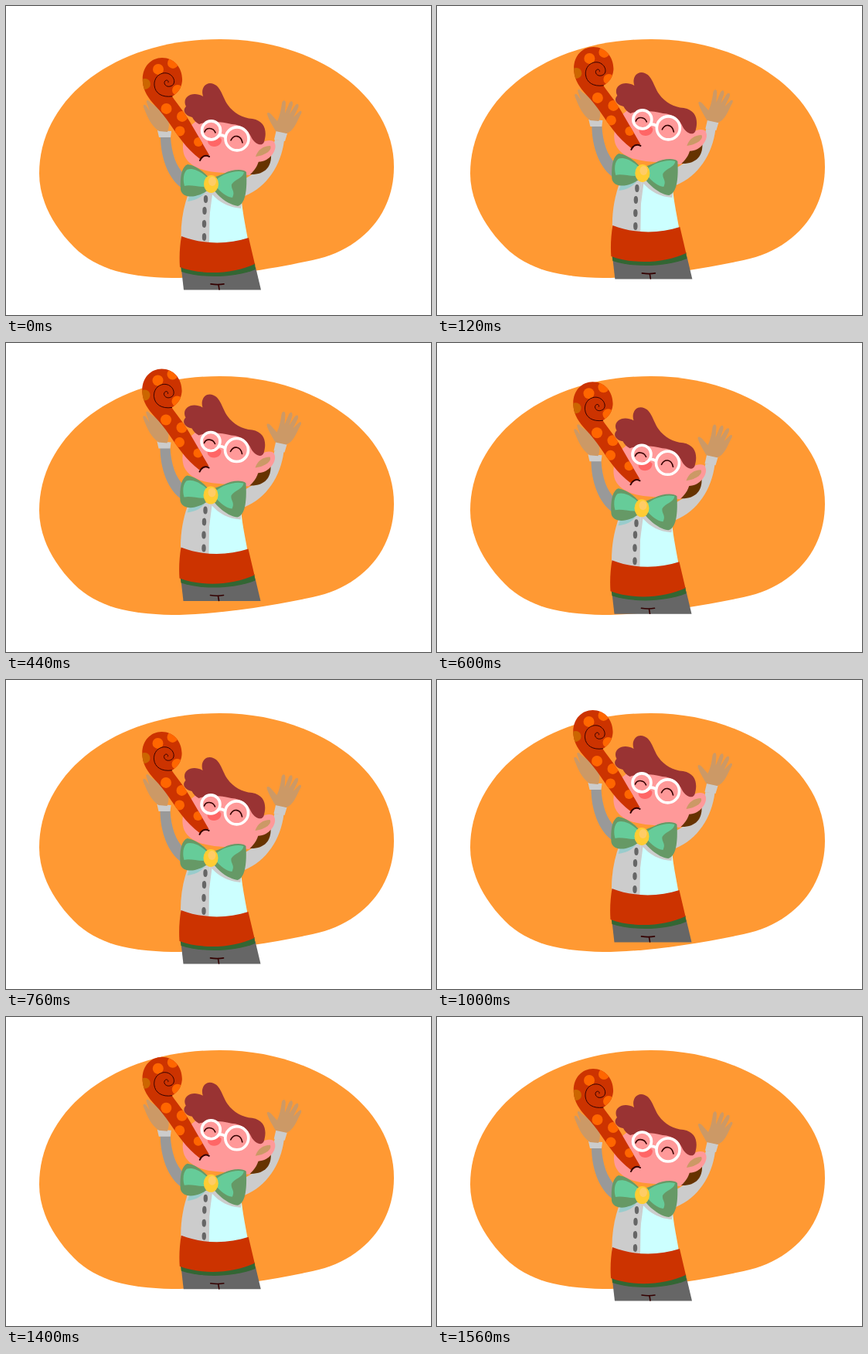
Animation, 550 px wide and 400 px high, one loop 1.6 s. Source, as an HTML page:

```html
<!DOCTYPE html>
<html lang="en">
<head>
<meta charset="utf-8">
<title>Party horn jump</title>
<style>
  html, body { margin: 0; width: 100%; height: 100%; overflow: hidden; background: #fff; }
  svg { display: block; width: 100vw; height: 100vh; }
  .line { fill: none; stroke: #300; stroke-width: 1.6; stroke-linecap: round; }
</style>
</head>
<body>
<svg viewBox="0 0 550 400">
  <defs>
    <path id="horn" d="M177 99C175 80 187 67 202 67C218 67 229 81 228 97C227 107 222 113 215 117C221 126 230 136 238 150L263 193C258 194 254 196 251 198C242 191 235 184 228 175C217 161 207 143 193 129C184 119 178 110 177 99Z"/>
    <clipPath id="hornClip"><use href="#horn"/></clipPath>
  </defs>

  <path fill="#f93" d="M277 43C400 43 502 115 502 208C502 270 460 313 405 327C350 340 270 352 215 352C160 351 118 342 88 312C60 284 43 250 43 217C43 120 140 43 277 43Z"/>

  <g id="boy">
    <!-- arms -->
    <path fill="#999" d="M200 169H213C214 190 220 208 231 218L228 236C210 224 200 196 200 169Z"/>
    <path fill="#ccc" d="M348 173L360 174C356 206 338 234 309 246L308 224C330 214 343 195 348 173Z"/>
    <path fill="#ccc" d="M196 161L214 162L213 170L198 170ZM350 160L364 165L361 175L347 173Z"/>

    <!-- hands -->
    <path fill="#c96" d="M198 162C188 155 184 146 178 131C177 127 180 127 182 130L186 136L182 125C181 121 184 121 187 125L205 138C212 146 212 156 209 163Z"/>
    <path fill="#c96" d="M349 162C345 155 340 147 338 140C338 137 341 138 343 140L351 149C354 143 356 134 357 126C358 121 362 121 362 126L361 139L366 127C368 122 372 122 371 128L367 140L374 129C377 125 380 127 378 132L372 144L379 137C382 134 384 137 381 141C376 151 372 162 363 165Z"/>

    <!-- shirt -->
    <path fill="#ccc" d="M237 240H268L266 309H227C225 285 229 261 237 240Z"/>
    <path fill="#cff" d="M264 240H304C305 264 310 284 314 308H263Z"/>
    <path fill="#ccc" d="M264 240H307L304 262C288 261 276 254 267 244L263 275Z"/>
    <path fill="#9cc" d="M238 244L258 241C252 249 244 252 235 253Z"/>
    <g fill="#666">
      <ellipse cx="258.500" cy="250" rx="2.700" ry="5"/>
      <ellipse cx="257" cy="265" rx="2.700" ry="5"/>
      <ellipse cx="256.500" cy="282" rx="2.700" ry="5"/>
      <ellipse cx="256.500" cy="299" rx="2.700" ry="5"/>
    </g>

    <!-- waist and trousers -->
    <path fill="#666" d="M227 341L323 338L330 367.500H230Z"/>
    <path fill="#363" d="M226 336L322 333L323 341C296 352 254 353 227 344Z"/>
    <path fill="#c30" d="M227 298C255 309 287 309 314 300L322 334C294 347 254 349 225 338C224 324 225 310 227 298Z"/>
    <path class="line" d="M265 360Q274 361.500 282 360M275 361L276 367"/>

    <!-- head -->
    <path fill="#630" d="M318 196L343 192C344 208 335 219 315 218Z"/>
    <path fill="#f99" d="M250 147C232 155 225 179 231 194C237 207 252 213 270 215L315 219C323 212 327 204 328 196L331 165L292 145Z"/>
    <path fill="#f99" d="M322 186C328 176 339 172 346 175C352 181 347 193 337 199C331 202 325 203 320 200Z"/>
    <path fill="#c96" d="M323 195C326 186 333 181 342 181C345 186 337 193 323 195Z"/>
    <path fill="#933" d="M241 144C231 142 228 135 233 130C227 119 240 109 255 117C252 108 257 100 264 100C278 101 279 116 287 128C295 139 306 145 319 146C336 149 338 163 334 176C331 183 322 178 318 171C313 160 306 154 292 153C277 149 262 149 250 153C246 151 243 148 241 144Z"/>

    <!-- face -->
    <path fill="#f66" d="M262 173C266 169 276 168 279 173C279 180 272 184 265 181C262 179 260 176 262 173Z"/>
    <g fill="none" stroke="#fff" stroke-width="3.600">
      <circle cx="265.500" cy="161" r="12"/>
      <circle cx="299" cy="172" r="15"/>
      <path d="M276 167Q281 167 285 170"/>
    </g>
    <path class="line" d="M257 163C259 157 268 157 271 164M291 174C295 166 304 167 306 177"/>

    <!-- horn -->
    <use href="#horn" fill="#c30"/>
    <g fill="#f60" clip-path="url(#hornClip)">
      <circle cx="197" cy="82" r="7"/>
      <circle cx="216" cy="74" r="7"/>
      <circle cx="180" cy="101" r="7" fill="#c60"/>
      <circle cx="222" cy="109" r="7"/>
      <circle cx="207.500" cy="133" r="7"/>
      <circle cx="228" cy="143" r="7"/>
      <circle cx="225" cy="162" r="6.500"/>
      <circle cx="249" cy="176" r="6"/>
    </g>
    <path class="line" stroke-width="1" style="stroke-width:1" d="M215 117C202 119 193 113 192 103C191 91 202 84 211 88C219 92 220 102 213 104C207 106 203 100 206 97C208 95 211 97 210 99"/>
    <path class="line" style="stroke-width:2" d="M251 200C253 195 258 192 263 195"/>

    <!-- bow tie -->
    <path fill="#696" d="M264 224C255 213 244 206 235 205C227 208 225 223 226 238C228 246 237 248 245 246C254 244 260 240 266 234C274 247 289 258 300 259C311 256 312 235 311 215C306 210 291 212 282 217Z"/>
    <path fill="#6c9" d="M262 224C253 214 241 209 234 212C229 217 229 226 231 233C239 231 249 235 259 234ZM272 225C280 218 296 212 308 215C307 223 296 224 292 231C291 238 297 239 293 248C285 247 278 241 272 234Z"/>
    <ellipse cx="265.500" cy="230.500" rx="9.500" ry="11.500" fill="#fc3"/>
    <ellipse cx="267" cy="227" rx="5" ry="6" fill="#fc6"/>
  </g>
</svg>

<script>
  const boy = document.getElementById('boy');
  const LOOP = 1600;
  // [time in ms, offset]
  const rise = [[0, 0], [360, -42], [760, 0], [1120, -42], [1560, 0], [LOOP, 0]];
  const sway = [[0, 0], [240, 0.7], [440, -0.5], [1200, -0.5], [1560, 0], [LOOP, 0]];

  function valueAt(keys, t) {
    const i = keys.findIndex(([time]) => time > t);
    const [t0, v0] = keys[i - 1], [t1, v1] = keys[i];
    return v0 + (v1 - v0) * (t - t0) / (t1 - t0);
  }

  function draw() {
    const t = performance.now() % LOOP;
    boy.setAttribute('transform', `translate(${valueAt(sway, t)} ${valueAt(rise, t)})`);
    requestAnimationFrame(draw);
  }
  draw();
</script>
</body>
</html>
```
